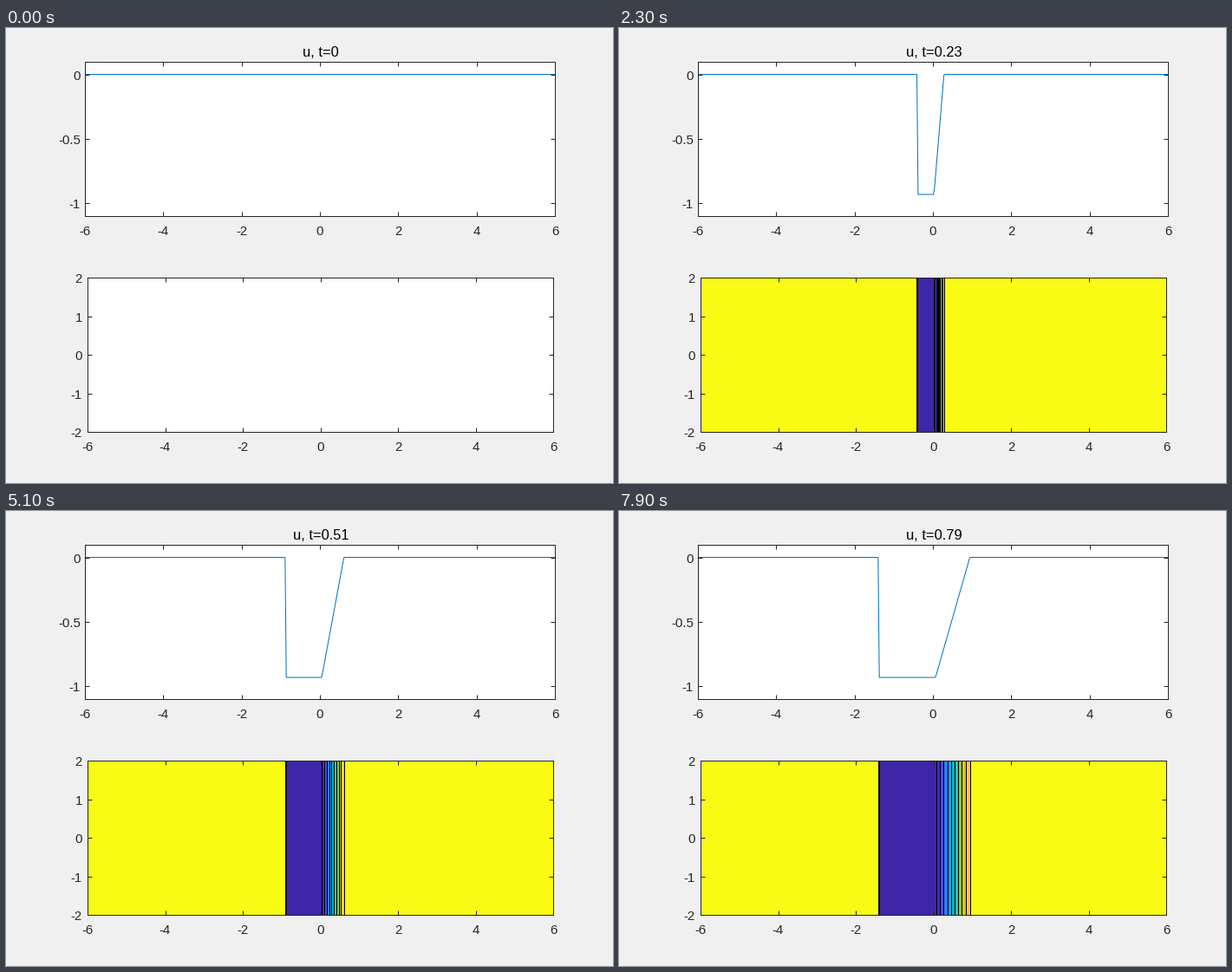
Recreate the animation shown at these times as a matplotlib script. Size 700 by 525 pixels, loop 8 s.

```python
import numpy as np
import matplotlib.pyplot as plt
from matplotlib.animation import FuncAnimation
from matplotlib.patches import Rectangle
from matplotlib.transforms import Affine2D

W, H, DPI = 700, 525, 100
PX = 72 / DPI                      # one pixel in points
FRAMES, STEP = 80, 100
INK, YELLOW = "#262626", "#F9FB15"
BANDS = ["#3E26A8", "#422EBE", "#484BEF", "#3578FD", "#259DE7",
         "#01B8C9", "#36C899", "#89CB52", "#E0BC2B", "#FCCD32"]

DX, DEPTH = 0.03, 0.934
cell = np.arange(-200, 201)
grid = DX * cell
levels = np.arange(-9, 1) / 10

plt.rcParams["font.family"] = "Liberation Sans"
plt.rcParams["axes.unicode_minus"] = False
fig = plt.figure(figsize=(W / DPI, H / DPI), dpi=DPI, facecolor="#F0F0F0")


def label(x, y, text, size=15, color=INK, ha="center"):
    return fig.text(x / W, 1 - y / H, text, fontsize=size * PX, color=color,
                    ha=ha, va="baseline")


def panel(x, y, w, h, ylim, yticks, label_x):
    """Axes at a pixel box measured from the lower left, with boxed ticks."""
    ax = fig.add_axes([x / W, y / H, w / W, h / H])
    xticks = range(-6, 7, 2)
    ax.set(xlim=(-6, 6), ylim=ylim, xticks=xticks, yticks=yticks)
    ax.tick_params(direction="in", top=True, right=True, length=5.4 * PX,
                   width=PX, color=INK, labelbottom=False, labelleft=False)
    for spine in ax.spines.values():
        spine.set(linewidth=PX, color=INK)
    for v in xticks:
        label(x + w * (v + 6) / 12, H - y + 22, f"{v:g}")
    for v in yticks:
        row = H - y - h * (v - ylim[0]) / (ylim[1] - ylim[0])
        label(label_x, row + 6.1, f"{v:g}", ha="right")
    return ax


top = panel(91, 308, 542, 178, (-1.1, 0.1), (-1, -0.5, 0), 86)
low = panel(94, 59, 537, 178, (-2, 2), (-2, -1, 0, 1, 2), 88)
top.set_axisbelow("line")
low.set_axisbelow(False)
title = label(363, 33, "", 16.5, "black")

# Shift the curve onto pixel centres
curve, = top.plot(grid, 0 * grid, color="#0072BD", lw=PX, snap=False,
                  transform=top.transData + Affine2D().translate(0.5, 0.33))
bars = [low.add_patch(Rectangle((0, -2), 0, 4, fc=c, ec="none", lw=0, snap=True))
        for c in BANDS]
lines = [low.axvline(0, color="black", lw=PX, snap=True)
         for _ in range(2 * len(levels))]
HALF_PX = 0.5 * 12 / 537
top.set(xlim=(-6, 6), ylim=(-1.1, 0.1))
low.set(xlim=(-6, 6), ylim=(-2, 2))


def wave(t):
    """Shock running left, rarefaction fan opening to the right."""
    shock = -int(58.7 * t + 1)
    u = -DEPTH * np.clip((1.18 * t - grid) / (1.11 * t), 0, 1)
    u[cell <= shock] = 0
    return u, shock * DX


def draw(i):
    t = i / 100
    title.set_text(f"u, t={t:g}")
    low.set_facecolor(YELLOW if i else "white")
    for art in bars + lines:
        art.set_visible(i > 0)
    if i == 0:
        curve.set_ydata(0 * grid)
        return
    u, shock = wave(t)
    curve.set_ydata(u)

    fan_u, fan_x = u[cell >= 0], grid[cell >= 0]
    end = np.argmax(fan_u >= 0) + 1
    fan = np.interp(levels, fan_u[:end], fan_x[:end]) - HALF_PX
    front = shock - DX * levels / DEPTH - HALF_PX
    edges = np.concatenate(([front[0]], fan))
    for bar, a, b in zip(bars, edges, edges[1:]):
        bar.set_x(a)
        bar.set_width(b - a)
    for line, x in zip(lines, np.concatenate((front, fan))):
        line.set_xdata([x, x])


anim = FuncAnimation(fig, draw, frames=FRAMES, interval=STEP,
                     init_func=lambda: draw(0), repeat=True, repeat_delay=0)
plt.show()
```
